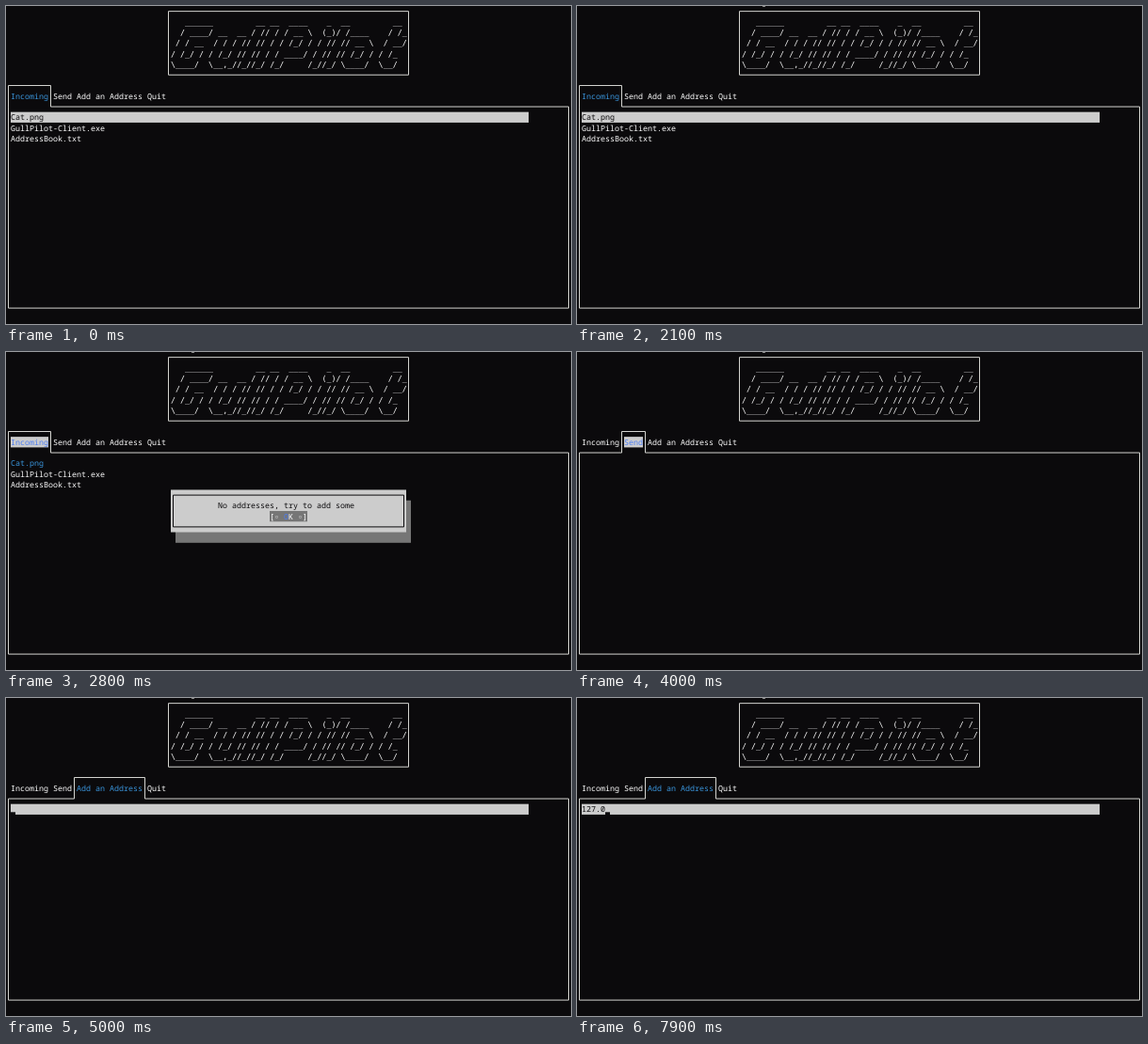
Animation of 600x338 px, one loop 8000 ms. Source, as an HTML page:

```html
<!DOCTYPE html>
<html lang="en">
<head>
<meta charset="utf-8">
<title>Terminal mail client</title>
<style>
  html, body { margin: 0; width: 100%; height: 100%; overflow: hidden; background: #0b0a0c; }
  svg { display: block; width: 600px; height: 338px; }
  text {
    font: 500 8.333px "Noto Sans Mono", "DejaVu Sans Mono", monospace;
    white-space: pre;
    text-rendering: geometricPrecision;
  }
  .banner { font-family: "DejaVu Sans Mono", monospace; }
  path { fill: none; stroke-width: 1; }
</style>
</head>
<body>
<svg viewBox="0 0 600 338"><g id="static"></g><g id="screen"></g></svg>
<script>
const LOOP = 8000;
const COL = 5, ROW = 338 / 30;
const BG = "#0b0a0c", PANEL = "#cccccc", WHITE = "#ffffff", LINE = "#d4d4d0";
const BLUE = "#3a96dd", BRIGHT_BLUE = "#4d7df2", GREY = "#767676";

const BANNER = String.raw`
   ______         __ __  ____    _  __         __
  / ____/ __  __ / // / / __ \  (_)/ /____    / /_
 / / __  / / / // // / / /_/ / / // // __ \  / __/
/ /_/ / / /_/ // // / / ____/ / // // /_/ / / /_
\____/  \__,_//_//_/ /_/     /_//_/ \____/  \__/`.split("\n").slice(1);

const TABS = [
  { label: "Incoming", col: 1 },
  { label: "Send", col: 10 },
  { label: "Add an Address", col: 15 },
  { label: "Quit", col: 30 }
];
const FILES = ["Cat.png", "GullPilot-Client.exe", "AddressBook.txt"];

// Moments at which each typed character appears
const KEYS = [[6200, "1"], [6300, "2"], [6600, "7"], [7500, "."], [7800, "0"]];

// Centres of columns and rows in the character grid
const midX = col => (col + 0.5) * COL;
const midY = row => (row + 0.5) * ROW;

const rect = (x, y, w, h, fill) =>
  `<rect x="${x}" y="${y}" width="${w}" height="${h}" fill="${fill}"/>`;
const cells = (col, row, cols, rows, fill) =>
  rect(col * COL, row * ROW, cols * COL, rows * ROW, fill);
const text = (col, row, str, fill, cls = "") =>
  `<text x="${col * COL}" y="${midY(row) + 3}" fill="${fill}" class="${cls}">${str}</text>`;
const path = (d, stroke) => `<path d="${d}" stroke="${stroke}"/>`;
const frame = (c0, r0, c1, r1, stroke) =>
  path(`M${midX(c0)} ${midY(r0)}H${midX(c1)}V${midY(r1)}H${midX(c0)}Z`, stroke);

function tabBar(active, focused) {
  const { label, col } = TABS[active];
  const left = midX(col - 1), right = midX(col + label.length);
  const top = midY(7), base = midY(9), bottom = midY(28);
  const outline = path(
    `M${midX(0)} ${bottom}V${base}H${left}V${top}H${right}V${base}H${midX(119)}V${bottom}Z`, LINE);
  const mark = focused ? cells(col, 8, label.length, 1, PANEL) : "";
  const labels = TABS.map((tab, i) =>
    text(tab.col, 8, tab.label, i !== active ? WHITE : focused ? BRIGHT_BLUE : BLUE));
  return outline + mark + labels.join("");
}

function fileList(focused) {
  const bar = focused ? cells(1, 10, 110, 1, PANEL) : "";
  return bar + FILES.map((name, i) =>
    text(1, 10 + i, name, i ? WHITE : focused ? BG : BLUE)).join("");
}

function inputField(t) {
  const typed = KEYS.filter(([at]) => t >= at).map(([, ch]) => ch).join("");
  const cursorOn = t >= 5000 && !(t >= 5200 && t < 5700) && !(t >= 7100 && t < 7500);
  const cursor = cursorOn ? rect((1 + typed.length) * COL, 121.3, COL, 2.7, BG) : "";
  return cells(1, 10, 110, 1, PANEL) + text(1, 10, typed, BG) + cursor;
}

function dialog() {
  return cells(36, 14, 50, 4, GREY) +
    cells(35, 13, 50, 4, PANEL) +
    frame(35, 13, 84, 16, BG) +
    text(45, 14, "No addresses, try to add some", BG) +
    cells(56, 15, 8, 1, GREY) +
    text(56, 15, "[▫", WHITE) +
    text(59, 15, "O", BRIGHT_BLUE) +
    text(60, 15, "K ▫]", WHITE);
}

function screenAt(t) {
  const tab = t < 2900 ? 0 : t < 4500 ? 1 : 2;
  const tabFocused = t >= 2500 && t < 5000;
  let out = tabBar(tab, tabFocused);
  if (tab === 0) out += fileList(!tabFocused);
  if (tab === 2) out += inputField(t);
  if (t >= 2800 && t < 4000) out += dialog();
  if (t >= 1600) out += rect(197, 0, 3, 1, "#8a8a8a");
  return out;
}

document.getElementById("static").innerHTML =
  rect(0, 0, 600, 338, BG) +
  frame(34, 0, 85, 6, LINE) +
  BANNER.map((line, i) => text(35, 1 + i, line, WHITE, "banner")).join("");

const screen = document.getElementById("screen");
const startTime = performance.now();
let shown = "";
function tick() {
  const next = screenAt((performance.now() - startTime) % LOOP);
  if (next !== shown) screen.innerHTML = shown = next;
  requestAnimationFrame(tick);
}
tick();
</script>
</body>
</html>
```
